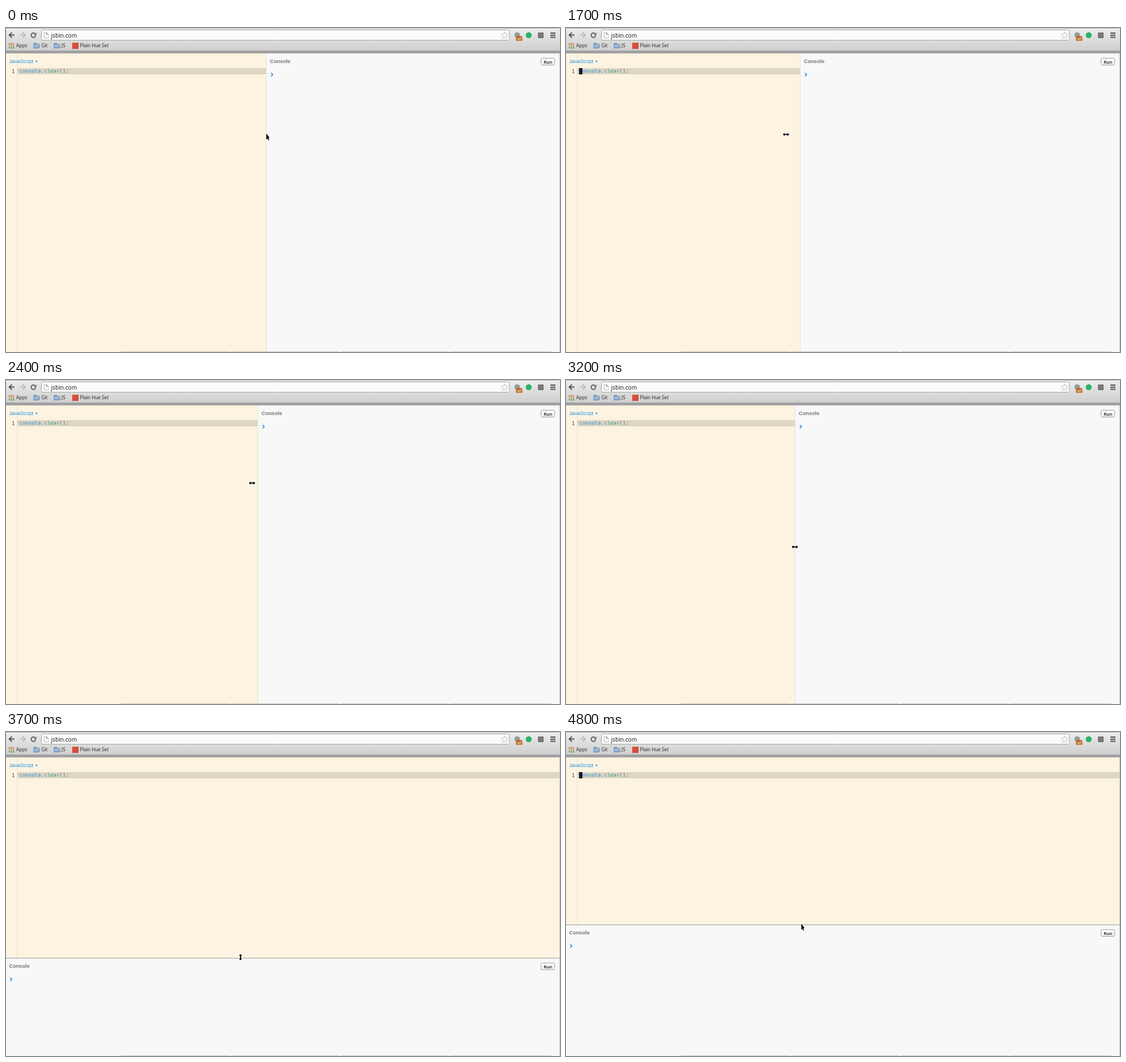
Recreate the animation shown at these times as an HTML page with a canvas. Size 978x573 px, loop 5000 ms.

```html
<!DOCTYPE html>
<html lang="en">
<head>
<meta charset="utf-8">
<title>Resizable panels</title>
<style>
  html, body { margin: 0; width: 978px; height: 573px; overflow: hidden; background: #f8f8f8; }
  canvas { position: absolute; left: 0; top: 0; }
  span { position: absolute; white-space: pre; line-height: 12px; }
  .ui { font-family: "Open Sans", "Noto Sans", sans-serif; font-size: 8.2px; color: #222; }
  .url { font-size: 10.2px; color: #111; }
  .btn { font-size: 7.8px; font-weight: 600; color: #111; }
  .head { font: 9.2px/12px "Liberation Sans", Arial, sans-serif; }
  .code { font: 9.05px/12px "DejaVu Sans Mono", monospace; }
</style>
</head>
<body>
<canvas id="stage" width="978" height="573"></canvas>
<script>
const W = 978, H = 573, TOP = 44.5, LOOP = 5000, STEP = 100;
const HOVER = 400, DRAG = 1300, STACK = 3500, RELEASE = 4600;
const ctx = document.getElementById('stage').getContext('2d');

function label(text, x, y, cls, color, weight) {
  const el = document.createElement('span');
  el.className = cls;
  el.textContent = text;
  if (color) el.style.color = color;
  if (weight) el.style.fontWeight = weight;
  document.body.append(el);
  place(el, x, y);
  return el;
}
// y is the middle of the line
function place(el, x, y) {
  el.style.left = x + 'px';
  el.style.top = (y - 6) + 'px';
}

label('jsbin.com', 79.5, 12.5, 'ui url');
label('Apps', 18, 31, 'ui');
label('Git', 62.5, 31, 'ui');
label('JS', 98, 31, 'ui');
label('Plain Hue Set', 130.5, 31, 'ui');
label('off', 902.2, 18.8, 'ui', '#fff', 600).style.fontSize = '6px';
label('JavaScript', 5.5, 59, 'head', '#1f93e6');
label('1', 10, 76.5, 'code', '#444');
const CHAR = 5.45, CODE = 23.6;
const firstChar = label('c', CODE, 76, 'code', '#268bd2');
label('onsole', CODE + CHAR, 76, 'code', '#268bd2');
label('.', CODE + CHAR * 7, 76, 'code', '#4d7684');
label('clear', CODE + CHAR * 8, 76, 'code', '#2f9f8e');
label('();', CODE + CHAR * 13, 76, 'code', '#4d7684');
const title = label('Console', 0, 59, 'head', '#777', 'bold');
const run = label('Run', 949.3, 59.5, 'ui btn');

// Turning points of the pointer, eased in between
const turnsX = [[1310, 459], [1910, 362], [2200, 447], [2750, 404], [3200, 404], [3600, 414]];
const turnsY = [[1700, 188], [2400, 182], [3200, 295], [3600, 399], [3900, 399], [4400, 340]];

function eased(turns, t) {
  let [t0, v0] = turns[0];
  for (const [t1, v1] of turns) {
    if (t < t1) {
      const k = Math.max(0, (t - t0) / (t1 - t0));
      return v0 + (v1 - v0) * (1 - Math.cos(Math.PI * k)) / 2;
    }
    t0 = t1;
    v0 = v1;
  }
  return v0;
}
const pointer = t => ({ x: eased(turnsX, t), y: eased(turnsY, t) });

function rect(x, y, w, h, fill) {
  ctx.fillStyle = fill;
  ctx.fillRect(x, y, w, h);
}
function box(x, y, w, h, r, fill, stroke) {
  ctx.beginPath();
  ctx.roundRect(x, y, w, h, r);
  ctx.fillStyle = fill;
  ctx.fill();
  if (stroke) { ctx.strokeStyle = stroke; ctx.lineWidth = 1; ctx.stroke(); }
}
function line(pts, color, width) {
  ctx.beginPath();
  pts.forEach(([x, y]) => ctx.lineTo(x, y));
  ctx.strokeStyle = color;
  ctx.lineWidth = width;
  ctx.stroke();
}
function poly(pts, fill, stroke, width = 1) {
  ctx.beginPath();
  pts.forEach(([x, y]) => ctx.lineTo(x, y));
  ctx.closePath();
  if (stroke) { ctx.strokeStyle = stroke; ctx.lineWidth = width; ctx.stroke(); }
  ctx.fillStyle = fill;
  ctx.fill();
}
function disc(x, y, r, fill) {
  ctx.beginPath();
  ctx.arc(x, y, r, 0, Math.PI * 2);
  ctx.fillStyle = fill;
  ctx.fill();
}
function fade(y0, y1, a, b) {
  const g = ctx.createLinearGradient(0, y0, 0, y1);
  g.addColorStop(0, a);
  g.addColorStop(1, b);
  return g;
}

function arrow(x, color, dir) {
  line([[x - 4.5 * dir, 12.5], [x + 4.5 * dir, 12.5]], color, 2);
  line([[x, 8], [x + 4.8 * dir, 12.5], [x, 17]], color, 2);
}
function reload(x, y) {
  ctx.beginPath();
  ctx.arc(x, y, 4, 0.3, 5.3);
  ctx.strokeStyle = '#555';
  ctx.lineWidth = 1.8;
  ctx.stroke();
  poly([[x + 5, y - 5], [x + 5, y], [x + 0.5, y]], '#555');
}
function page(x, y) {
  poly([[x, y], [x + 4, y], [x + 7, y + 3], [x + 7, y + 9.5], [x, y + 9.5]], '#fff', '#777');
  line([[x + 4, y], [x + 4, y + 3], [x + 7, y + 3]], '#777', 1);
}
function star(x, y) {
  const pts = Array.from({ length: 10 }, (_, i) => {
    const r = i % 2 ? 2.8 : 6, a = (i / 5 - 0.5) * Math.PI;
    return [x + r * Math.cos(a), y + r * Math.sin(a)];
  });
  poly(pts, '#fff', '#777');
}
function folder(x) {
  box(x + 0.5, 27, 5, 4, 1, '#7fa3c4', '#6988a5');
  box(x + 0.5, 28.5, 10, 7, 1, fade(28, 36, '#a9c9e4', '#7ea6ca'), '#6988a5');
}

function toolbar() {
  rect(0, 0, W, 41, fade(0, 41, '#ececec', '#cecece'));
  rect(0, 0, W, 1, '#b4b4b4');
  rect(0, 41, W, 4, '#a4a2a3');
  rect(0, 40, W, 1, '#999');

  arrow(10.5, '#555', -1);
  arrow(29.5, '#bbb', 1);
  reload(48.5, 12.7);
  box(62.5, 3.5, 826, 18, 2, '#fafcfd', '#a6a6a6');
  page(67.5, 8);
  star(880.3, 13.2);

  disc(902.5, 12.5, 5, '#999');
  box(900.5, 14.5, 11, 8, 1.5, '#b9601f');
  disc(922.8, 12.8, 5.3, '#27b36a');
  rect(939, 8, 10, 10, '#777');
  for (let i = 0; i < 3; i++) rect(961, 8 + i * 3.7, 9, 2, '#4c4c4c');

  const hues = ['#de5a45', '#dfa03c', '#4aa564'];
  for (let i = 0; i < 9; i++) {
    const col = i % 3, row = Math.floor(i / 3);
    rect(5 + col * 3.5, 27 + row * 3.4, 2.3, 2.3, hues[(row + (col > 1)) % 3]);
  }
  folder(48.5);
  folder(84.5);
  rect(117, 26, 11, 11, '#d84a3c');
}

function doubleArrow(x, y, angle) {
  ctx.save();
  ctx.translate(x, y);
  ctx.rotate(angle);
  const half = [[-5.5, 0], [-2.5, -3], [-2.5, -1], [2.5, -1], [2.5, -3]];
  poly([...half, ...half.map(([a, b]) => [-a, -b])], '#000', '#fff', 1.4);
  ctx.restore();
}
function moveCursor(x, y) {
  doubleArrow(x, y, 0);
  doubleArrow(x, y, Math.PI / 2);
  rect(x - 3, y - 0.9, 6, 1.8, '#000');
}
function arrowCursor(x, y) {
  const shape = [[0, 0], [0, 11], [2, 8.7], [3.4, 12.2], [5, 11.4], [3.6, 8], [6, 7.7]];
  poly(shape.map(([a, b]) => [x + a, y + b]), '#000', '#fff', 1.2);
}

function editor(w, bottom, t) {
  rect(0, 45, w, bottom - 45, '#fcf4e1');
  rect(19, 45, 1, bottom - 45, '#eee5cf');
  rect(20, 71, w - 20, 11, '#ddd6c3');
  poly([[51.5, 58], [56.5, 58], [54, 60.7]], '#1f93e6');
  const block = (t + 535) % 1060 < 530;
  if (block) rect(23, 71, 6, 11, '#07121f');
  firstChar.style.color = block ? '#24506f' : '#268bd2';
}
function output(x, top) {
  const px = x + 2;
  line([[px, top + 35], [px + 2.8, top + 38], [px, top + 41]], '#3189e8', 1.8);
  place(title, x, top + 14.5);
  const by = Math.round(top + 8.5) + 0.5;
  box(944.5, by, 24, 12, 2.5, fade(by, by + 12, '#fff', '#ededed'), '#a0a0a0');
  place(run, 949.3, top + 15);
}

function draw(now) {
  const t = Math.floor((now % LOOP) / STEP) * STEP;
  const p = pointer(t), late = pointer(t - STEP);
  const stacked = t >= STACK;
  const hover = t >= HOVER && t < DRAG;
  // the panels trail the pointer by one step
  const splitX = stacked ? W : Math.round(late.x);
  const splitY = stacked ? Math.round(late.y) + 1 : H;

  rect(0, 45, W, H - 45, '#f8f8f8');
  editor(splitX, splitY, t);
  if (stacked) {
    rect(0, splitY - 1, W, 2, '#c6c5c0');
    output(5.5, splitY - 0.5);
  } else {
    rect(splitX, 45, 1, H - 45, '#e4e3df');
    if (hover) for (let y = 45; y < H; y += 4) rect(splitX, y, 1, 2, '#7d98ab');
    output(splitX + 7, TOP);
  }

  rect(W - 1, 45, 1, H - 45, '#c4c4c4');
  for (let x = 203; x < 900; x += 194) {
    rect(x, 572, Math.min(191, 962 - x), 1, '#c6c5c2');
  }
  toolbar();

  if (t < HOVER) arrowCursor(p.x + 0.5, p.y - 1.5);
  else if (hover) moveCursor(p.x, p.y + 0.5);
  else if (!stacked) doubleArrow(p.x, p.y + 0.3, 0);
  else if (t < RELEASE) doubleArrow(p.x, p.y - 0.8, Math.PI / 2);
  else arrowCursor(p.x + 1.3, p.y - 1);
}

const start = performance.now();
function tick() {
  draw(performance.now() - start);
  requestAnimationFrame(tick);
}
tick();
</script>
</body>
</html>
```
